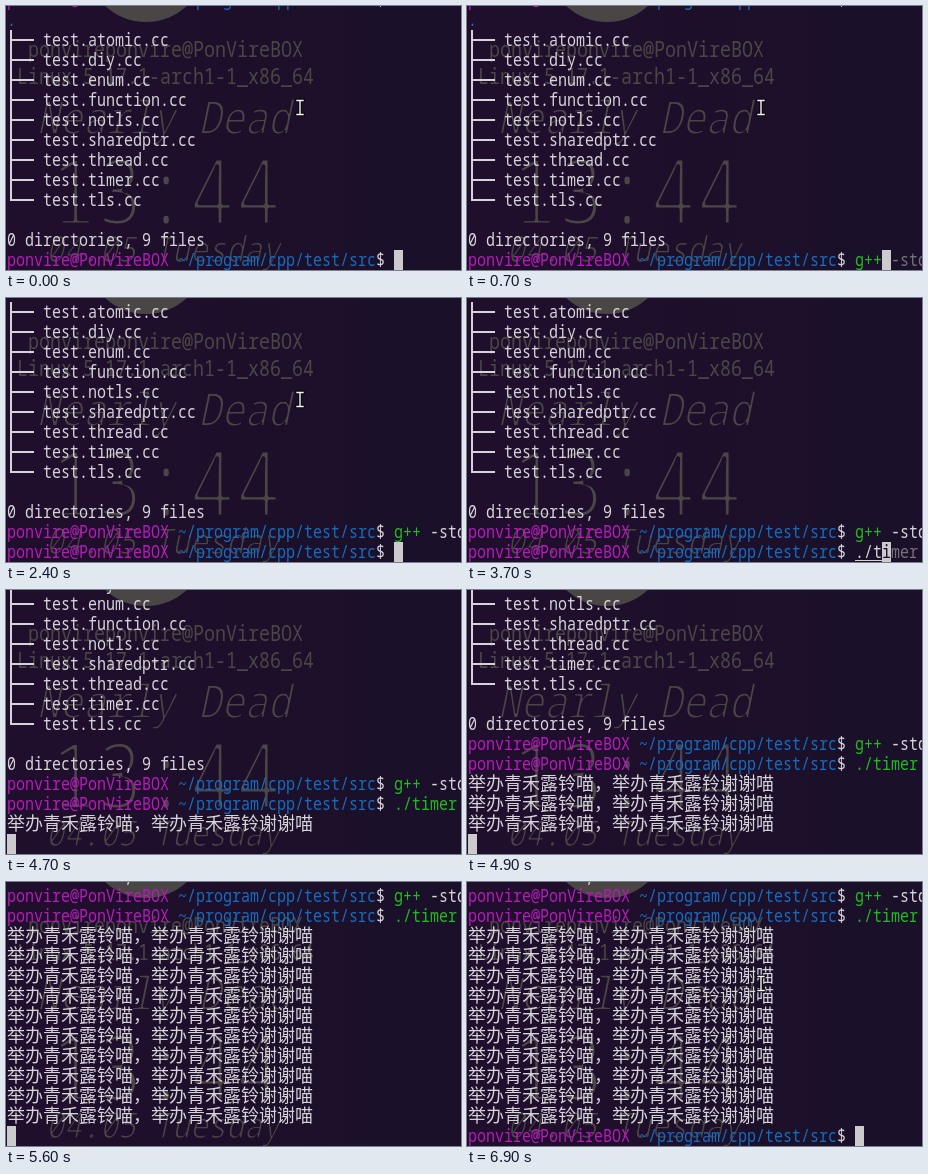
An HTML page with a canvas for the animation above (7 s loop, 455 by 264 pixels).

```html
<!DOCTYPE html>
<html lang="zh-CN">
<head>
<meta charset="utf-8">
<title>Terminal</title>
<style>
html, body { margin: 0; width: 100%; height: 100%; overflow: hidden; background: #1b1029; }
canvas { display: block; }
</style>
</head>
<body>
<canvas id="stage" width="455" height="264"></canvas>
<script>
const ctx = document.getElementById('stage').getContext('2d');
const W = 455, H = 264, LOOP = 7000;
const CELL = 9, ROW = 20, LEFT = 1, TOP = 4, LAST = 12;
const TALL = 1.2; // the terminal face is tall and narrow
const MONO = '"Noto Sans Mono", "DejaVu Sans Mono", monospace';
const CJK = '"Noto Sans CJK SC", "Noto Sans CJK", sans-serif';
const INK = '#d6d3d9', DIM = '#77717c', WALL = '#4a4645', BG = '#1b1029';
const PINK = '#b81bbc', BLUE = '#176cbc', GREEN = '#22bb1f';

const USER = 'ponvire', HOST = 'PonVireBOX';
const FILES = ['atomic', 'diy', 'enum', 'function', 'notls', 'sharedptr', 'thread', 'timer', 'tls'];
const BUILD = 'g++ -std=c++20 test.timer.cc -o timer';
const RUN = './timer';
const OUTPUT = '举办青禾露铃喵，举办青禾露铃谢谢喵';
const PROMPT_COLS = `${USER}@${HOST} ~/program/cpp/test/src$ `.length;

const colX = col => LEFT + col * CELL;
const rowY = row => TOP + row * ROW;

// Thin wallpaper lettering: fill the glyphs, then trim their edges.
function thin(g, str, x, base, px, trim, style = 'normal') {
  g.save();
  g.translate(x, base);
  g.scale(1, TALL);
  g.font = `${style} 300 ${px}px ${MONO}`;
  g.textAlign = 'center';
  g.fillText(str, 0, 0);
  if (trim) {
    g.globalCompositeOperation = 'destination-out';
    g.lineWidth = trim;
    g.lineJoin = 'round';
    g.strokeText(str, 0, 0);
  }
  g.restore();
}

function makeWallpaper() {
  const layer = document.createElement('canvas');
  layer.width = W;
  layer.height = H;
  const g = layer.getContext('2d');
  g.fillStyle = WALL;
  thin(g, `${USER}${USER}@${HOST}`, 159.5, 51, 18.33, 0);
  thin(g, 'Linux 5.17.1-arch1-1_x86_64', 159.5, 78, 18.33, 0);
  thin(g, 'Nearly Dead', 157.5, 127.5, 38.5, 1.6, 'italic');
  thin(g, '13:44', 160, 219, 77, 4);
  thin(g, '04.05 Tuesday', 157, 255.5, 30, 1.1, 'italic');
  g.beginPath();
  g.arc(140, -44, 60, 0, Math.PI * 2);
  g.fill();

  const back = g.createLinearGradient(0, 0, 380, 0);
  back.addColorStop(0, '#200e2d');
  back.addColorStop(1, BG);
  g.globalCompositeOperation = 'destination-over';
  g.fillStyle = back;
  g.fillRect(0, 0, W, H);
  return layer;
}

function put(str, col, row, color = INK) {
  ctx.save();
  ctx.translate(colX(col), rowY(row) + 16);
  ctx.scale(1, TALL);
  ctx.font = `300 15px ${MONO}`;
  ctx.fillStyle = color;
  ctx.fillText(str, 0, 0);
  ctx.restore();
}

function prompt(row) {
  put(`${USER}@${HOST}`, 0, row, PINK);
  put('~/program/cpp/test/src', USER.length + HOST.length + 2, row, BLUE);
  put('$', PROMPT_COLS - 2, row);
}

function branch(row, isLast) {
  const y = rowY(row);
  ctx.fillStyle = INK;
  ctx.fillRect(4, y, 2, isLast ? 11 : ROW);
  ctx.fillRect(4, y + 9, 24, 2);
}

function tree(scroll) {
  prompt(-1 - scroll);
  put('tree', PROMPT_COLS, -1 - scroll, GREEN);
  put('.', 0, -scroll, BLUE);
  FILES.forEach((name, i) => {
    const row = i + 1 - scroll;
    branch(row, i === FILES.length - 1);
    put(`test.${name}.cc`, 4, row);
  });
  put('0 directories, 9 files', 0, 11 - scroll);
}

// Typed part, then the greyed suggestion.
function command(text, typed, row, head, headColor) {
  if (!typed) return;
  put(text.slice(typed), PROMPT_COLS + typed, row, DIM);
  put(text.slice(0, Math.min(head, typed)), PROMPT_COLS, row, headColor);
  if (typed > head) put(text.slice(head, typed), PROMPT_COLS + head, row);
}

function block(col, under = '') {
  ctx.fillStyle = '#cdcacd';
  ctx.fillRect(colX(col), rowY(LAST), CELL, ROW);
  put(under, col, LAST, BG);
}

function pointer() {
  const x = 294, y = 94;
  const beam = (color, width) => {
    ctx.strokeStyle = color;
    ctx.lineWidth = width;
    ctx.beginPath();
    ctx.moveTo(x - 3, y + .5);
    ctx.lineTo(x + 3, y + .5);
    ctx.moveTo(x, y + .5);
    ctx.lineTo(x, y + 14.5);
    ctx.moveTo(x - 3, y + 14.5);
    ctx.lineTo(x + 3, y + 14.5);
    ctx.stroke();
  };
  ctx.lineCap = 'square';
  beam('#08050c', 3.4);
  beam('#f4f4f4', 1.4);
}

// Value of the last [time, value] step that has passed.
const at = (steps, t) => steps.reduce((v, [start, next]) => t >= start ? next : v, 0);

const buildKeys = [[300, 1], [600, 2], [700, 3], [1100, BUILD.length]];
const runKeys = [[3400, 1], [3500, 2], [3700, 3], [4400, RUN.length]];
const blink = [[0, 1], [1900, 0], [2400, 1], [3000, 0], [3400, 1],
  [5000, 0], [5500, 1], [6100, 0], [6600, 1]];
const wallpaper = makeWallpaper();

function draw(t) {
  const lines = t < 4700 ? 0 : Math.min(10, Math.floor((t - 4700) / 100) + 1);
  const scroll = (t >= 1300) + (t >= 4500) + lines;
  const built = at(buildKeys, t), ran = at(runKeys, t);
  const first = 12 - scroll, second = 13 - scroll;

  ctx.drawImage(wallpaper, 0, 0);
  tree(scroll);
  prompt(first);
  command(BUILD, built, first, 3, built < 3 ? INK : GREEN);

  if (t >= 2300) {
    prompt(second);
    const done = ran === RUN.length;
    command(RUN, ran, second, RUN.length, done ? GREEN : INK);
    if (ran && !done) {
      ctx.fillStyle = INK;
      ctx.fillRect(colX(PROMPT_COLS), rowY(second) + 18, ran * CELL, 1);
    }
  }

  ctx.font = `400 18px ${CJK}`;
  ctx.fillStyle = INK;
  for (let i = 0; i < lines; i++) ctx.fillText(OUTPUT, LEFT, rowY(second + 1 + i) + 16);
  if (t >= 5700) prompt(LAST);

  if (at(blink, t)) {
    if (t < 1300) block(PROMPT_COLS + built, built ? BUILD[built] : '');
    else if (t < 2300) block(0);
    else if (t < 4500) block(PROMPT_COLS + ran, ran ? RUN[ran] : '');
    else block(t < 5700 ? 0 : PROMPT_COLS);
  }
  if (t < 3000 || t >= 6900) pointer();
}

const start = performance.now();
function tick() {
  draw((performance.now() - start) % LOOP);
  requestAnimationFrame(tick);
}
tick();
</script>
</body>
</html>
```
